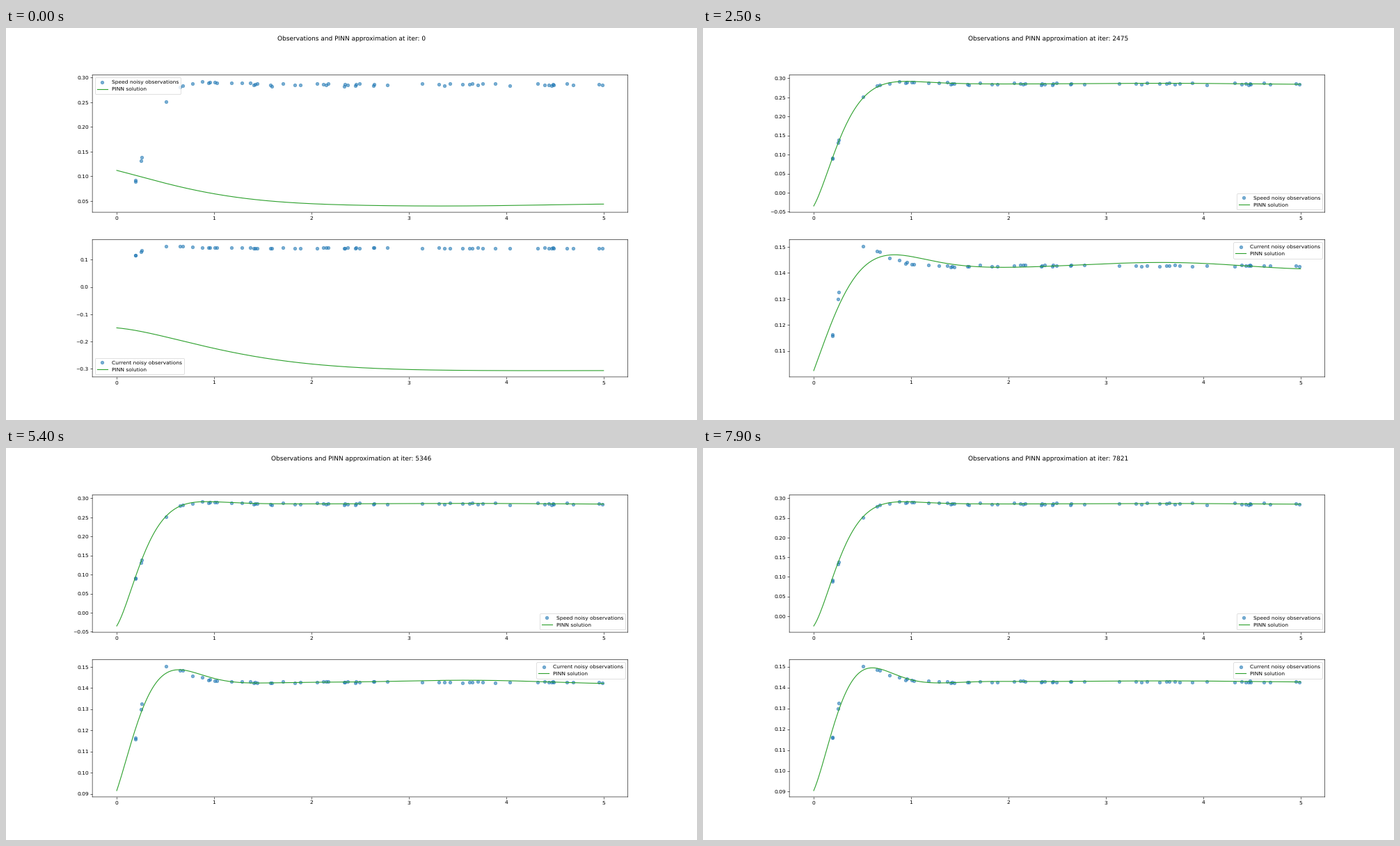
Write a matplotlib script that moves like this. It is 993 by 564 pixels and loops after 8 s.

```python
import numpy as np
import matplotlib.pyplot as plt
from matplotlib.animation import FuncAnimation

W, H, DPI = 993, 564, 53.6875
FRAMES, STEP_MS, ITERS = 80, 100, 99

plt.rcParams["font.family"] = "DejaVu Sans"
plt.rcParams["text.hinting"] = "none"

rng = np.random.default_rng(3)
t = np.linspace(0, 5, 300)

# Random sampling times, denser where samples happened to cluster
obs_t = np.array([
    .189, .192, .246, .257, .507, .65, .68, .775, .875, .94, .96, 1.01, 1.025,
    1.18, 1.285, 1.37, 1.405, 1.42, 1.445, 1.58, 1.595, 1.71, 1.83, 1.885, 2.055,
    2.12, 2.15, 2.175, 2.335, 2.345, 2.37, 2.45, 2.46, 2.495, 2.635, 2.645, 2.78,
    3.14, 3.31, 3.365, 3.42, 3.55, 3.625, 3.65, 3.705, 3.76, 3.885, 4.035, 4.32,
    4.395, 4.435, 4.465, 4.48, 4.49, 4.62, 4.685, 4.955, 4.985])


def ring(t, start, level, decay, freq, lag):
    """Damped oscillation from start towards level."""
    wave = np.cos(freq * t) + lag * np.sin(freq * t)
    return level + (start - level) * np.exp(-decay * t) * wave


def observe(noise, *shape):
    return ring(obs_t, *shape) + rng.uniform(-noise, noise, len(obs_t))


# Training stages: stage, start, decay, freq, lag, ripple
speed_keys = [
    (0, .112, 1.1, .9, .43, -.0015),
    (1, .215, 1.0, .9, .40, 0),
    (6, .0621, 2.0, 2.0, .46, -.005),
    (17, -.0129, 3.3, 2.7, .67, .002),
    (25, -.035, 3.9, 3.05, .82, .0015),
    (45, -.0385, 4.2, 3.2, .90, .001),
    (79, -.025, 4.2, 3.2, .95, .001)]
current_keys = [
    (0, -.150, 1.15, .7, 1.35, 0),
    (1, .131, 1.2, 1.0, .50, .002),
    (6, .1132, 3.0, 2.3, .10, .003),
    (17, .1081, 2.1, 2.4, 0, .001),
    (34, .0961, 2.9, 3.5, 0, .002),
    (45, .0924, 3.0, 3.7, .02, .0014),
    (63, .0906, 3.3, 4.5, .24, .0004),
    (79, .0905, 3.2, 4.6, .24, .0003)]

fig, axes = plt.subplots(2, 1, figsize=((W + 1e-6) / DPI, (H + 1e-6) / DPI), dpi=DPI)
title = fig.suptitle("")


class Panel:
    def __init__(self, ax, name, obs, keys, levels, legend_w):
        self.ax, self.obs, self.levels = ax, obs, levels
        self.stages, *self.params = np.array(keys).T
        self.box = legend_w, 0.1434
        ax.scatter(obs_t, obs, color="C0", alpha=0.6, snap=False,
                   label=f"{name} noisy observations")
        self.line, = ax.plot(t, 0 * t, color="C2", label="PINN solution")
        ax.set_xlim(-0.25, 5.25)
        for spine in ax.spines.values():
            spine.set_snap(False)
        self.legend = ax.legend(loc="upper right")

    def solution(self, i):
        start, decay, freq, lag, ripple = (
            np.interp(i, self.stages, p) for p in self.params)
        first, final = self.levels
        level = final + (first - final) * np.exp(-6 * i)
        tail = ripple * t / 5 * np.cos(1.9 * (t - 3.5))
        return ring(t, start, level, decay, freq, lag) + tail

    def free_corner(self, y, lo, hi):
        """First corner whose legend box holds no data."""
        fx = (np.r_[obs_t, t] + 0.25) / 5.5
        fy = (np.r_[self.obs, y] - lo) / (hi - lo)
        w, h = self.box
        for corner in ("upper right", "upper left", "lower left", "lower right"):
            in_x = fx > 1 - w if "right" in corner else fx < w
            in_y = fy > 1 - h if "upper" in corner else fy < h
            if not (in_x & in_y).any():
                break
        return corner

    def update(self, i):
        y = self.solution(i)
        lo, hi = min(y.min(), self.obs.min()), max(y.max(), self.obs.max())
        pad = 0.05 * (hi - lo)
        lo, hi = lo - pad, hi + pad
        self.line.set_ydata(y)
        self.ax.set_ylim(lo, hi)
        self.legend.set_loc(self.free_corner(y, lo, hi))


speed = observe(.003, 0, .2855, 4.4, 3.5, 1.257)
current = observe(.0004, .016, .1428, 4.8, 3.8, -.338)
panels = [
    Panel(axes[0], "Speed", speed, speed_keys, (.0425, .286), 0.163),
    Panel(axes[1], "Current", current, current_keys, (-.306, .143), 0.17)]


def update(i):
    title.set_text(f"Observations and PINN approximation at iter: {i * ITERS}")
    for panel in panels:
        panel.update(i)


anim = FuncAnimation(fig, update, frames=FRAMES, interval=STEP_MS,
                     init_func=lambda: update(0), repeat=True, repeat_delay=0)
plt.show()
```
